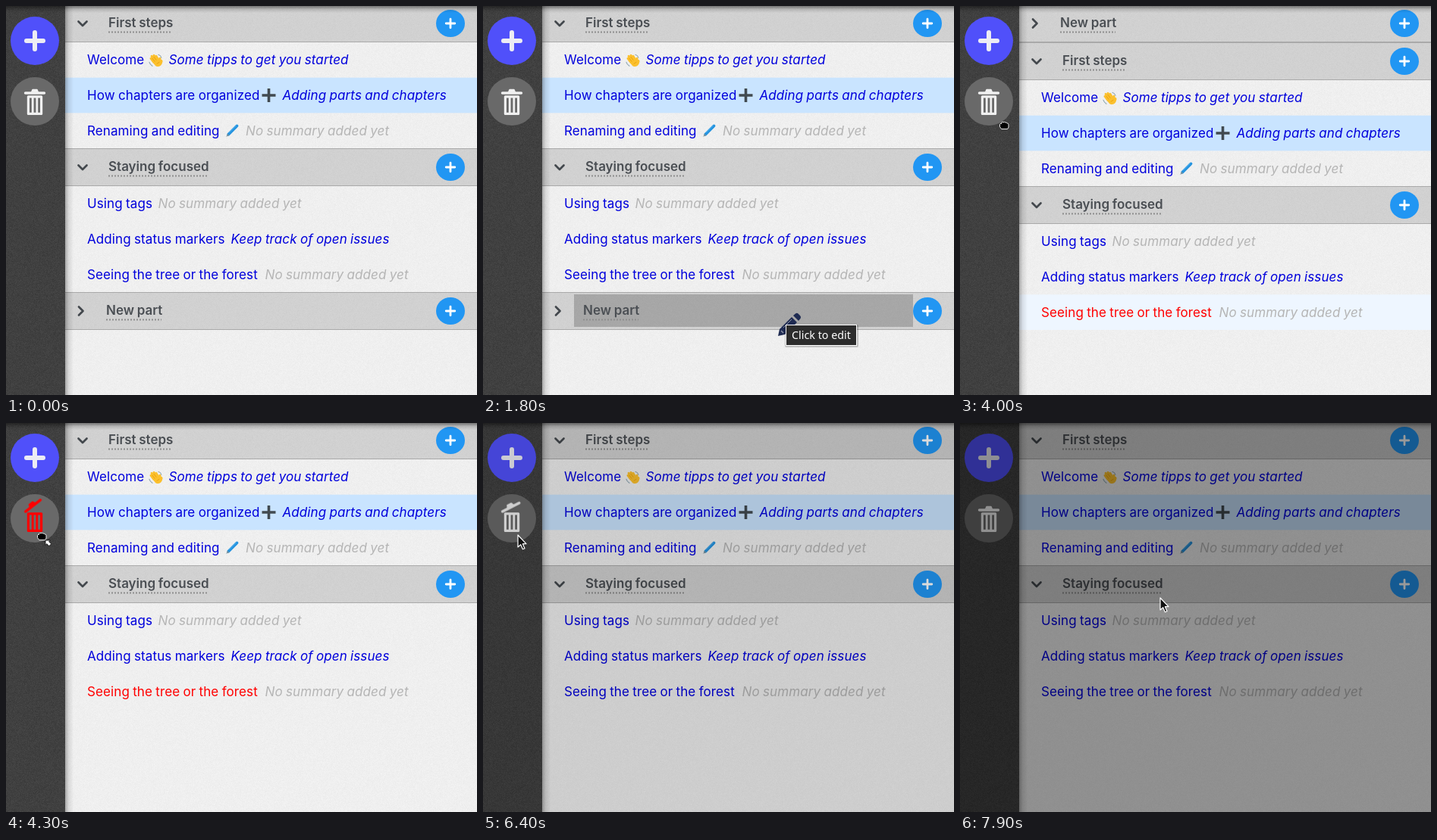
Recreate the animation shown at these times as an HTML page with a canvas. Size 621 px wide and 514 px high, loop 8 s.

```html
<!DOCTYPE html>
<html lang="en">
<head>
<meta charset="utf-8">
<title>Outline editor</title>
<style>
html, body { margin: 0; width: 621px; height: 514px; overflow: hidden; background: #f0f0f0; }
canvas, svg { position: absolute; left: 0; top: 0; display: block; }
text { font: 17px Inter, sans-serif; letter-spacing: .1px; word-spacing: -.6px; white-space: pre; }
.head { font-weight: 600; fill: #4a4e53; letter-spacing: 0; }
.name { fill: #0000dc; }
.sum { fill: #0000dc; font-style: italic; }
.none { fill: #b5b5b5; }
.tip text { font: 14.3px "Noto Sans", sans-serif; letter-spacing: 0; word-spacing: 0; fill: #fff; }
.line { fill: none; stroke-linecap: round; stroke-linejoin: round; }

/* 1.25% is one tenth of a second */
#first, #focus, #part, #hoverRow, #hoverName, #edit, #tip, #bin, #lid, #dim,
#cursor, #arrow, #pencil, #hand, #copy, #move { animation: 8s step-end infinite; }
#edit, #tip, #hoverRow, #arrow, #pencil, #hand, #copy, #move, #dim { opacity: 0; }

#first { animation-name: first; }
@keyframes first {
  0%, 52.5%, 100% { transform: translateY(-2px); }
  43.75% { transform: translateY(48px); }
}
#focus { animation-name: focus; }
@keyframes focus {
  0%, 52.5%, 100% { transform: translateY(188px); }
  36.25% { transform: translateY(238px); }
}
#part { animation-name: part; }
@keyframes part {
  0%, 100% { transform: translateY(378px); opacity: 1; }
  36.25% { transform: translateY(188px); opacity: 1; }
  43.75% { transform: translateY(-2px); opacity: 1; }
  52.5% { transform: translateY(-2px); opacity: 0; }
}
#edit { animation-name: edit; }
@keyframes edit {
  0%, 36.25%, 100% { opacity: 0; }
  12.5% { opacity: .07; }
  13.75% { opacity: .14; }
  15% { opacity: .2; }
}
#tip { animation-name: tip; }
@keyframes tip { 0%, 26.25%, 100% { opacity: 0; } 22.5% { opacity: 1; } }
#hoverRow { animation-name: hoverRow; }
@keyframes hoverRow { 0%, 52.5%, 100% { opacity: 0; } 36.25% { opacity: 1; } }
#hoverName { animation-name: hoverName; }
@keyframes hoverName { 0%, 80%, 100% { fill: #0000dc; } 36.25% { fill: #f00; } }

#bin { animation-name: bin; }
@keyframes bin { 0%, 80%, 100% { color: #f0f0f0; } 51.25% { color: #f00; } }
#lid { transform-origin: 25px 117px; animation-name: lid; }
@keyframes lid {
  0%, 81.25%, 100% { transform: none; }
  51.25% { transform: translate(1px, 1px) rotate(-20deg); }
  52.5% { transform: translate(1.5px, 2px) rotate(-38deg); }
  80% { transform: translate(1px, 2px) rotate(-27deg); }
}
#dim { animation-name: dim; }
@keyframes dim {
  0%, 100% { opacity: 0; }
  80% { opacity: .14; }
  81.25% { opacity: .27; }
  82.5% { opacity: .36; }
  83.75%, 99.99% { opacity: .4; }
}

#cursor { animation-name: cursor; }
@keyframes cursor {
  0% { transform: translate(425px, 540px); }
  7.5% { transform: translate(425px, 500px); animation-timing-function: steps(4); }
  12.5% { transform: translate(408px, 427px); animation-timing-function: steps(3); }
  16.25% { transform: translate(404px, 421px); }
  28.75% { transform: translate(385px, 419px); }
  30% { transform: translate(340px, 416px); }
  36.25% { transform: translate(209px, 303px); animation-timing-function: steps(8); }
  46.25% { transform: translate(88px, 172px); }
  47.5% { transform: translate(74px, 163px); }
  48.75% { transform: translate(65px, 160px); }
  50% { transform: translate(58px, 158px); }
  51.25% { transform: translate(55px, 155px); }
  52.5% { transform: translate(50px, 152px); }
  53.75% { transform: translate(47px, 150px); }
  78.75% { transform: translate(48px, 148px); }
  80% { transform: translate(46px, 148px); }
  98.75%, 100% { transform: translate(264px, 231px); }
}
#arrow { animation-name: arrow; }
@keyframes arrow { 0%, 12.5% { opacity: 0; } 7.5%, 80%, 100% { opacity: 1; } }
#pencil { animation-name: pencil; }
@keyframes pencil { 0%, 30%, 100% { opacity: 0; } 12.5% { opacity: 1; } }
#hand { animation-name: hand; }
@keyframes hand { 0%, 80%, 100% { opacity: 0; } 30% { opacity: 1; } }
#copy { animation-name: copy; }
@keyframes copy { 0%, 47.5%, 100% { opacity: 0; } 30% { opacity: 1; } }
#move { animation-name: move; }
@keyframes move { 0%, 80%, 100% { opacity: 0; } 51.25% { opacity: 1; } }
</style>
</head>
<body>
<canvas id="paper" width="621" height="514"></canvas>
<svg width="621" height="514" viewBox="0 0 621 514">
  <defs>
    <linearGradient id="side">
      <stop stop-opacity=".3"/><stop offset=".4" stop-opacity=".1"/><stop offset="1" stop-opacity="0"/>
    </linearGradient>
    <linearGradient id="top" x2="0" y2="1">
      <stop stop-opacity=".45"/><stop offset=".5" stop-opacity=".13"/><stop offset="1" stop-opacity="0"/>
    </linearGradient>
    <g id="wave" class="line" stroke="#fbc02d">
      <path d="M-3 0L2 6Q6 7 7 2Z" fill="#fbc02d" stroke-width="5"/>
      <path d="M-2 3L-6 -2M0 1L-5 -5M2 0L-2 -6M4 0L1 -5M6 3L6 -2" stroke-width="2.9"/>
      <path d="M-1 2L-4 -2M1 0L-2 -4M5 3L2 5" stroke="#e59600" stroke-width=".7"/>
      <path d="M4 -7Q7 -6 8 -3M-8 3Q-7 6 -4 8" stroke="#8ba4b0" stroke-width="1.1"/>
    </g>
    <path id="plus" d="M-9 0H9M0 -9V9" stroke="#414a50" stroke-width="3.6"/>
    <g id="pen" class="line">
      <path d="M-5 5L6.2 -6.2" stroke="#2493df" stroke-width="3.8"/>
      <path d="M-4 2.5L5 -6.5" stroke="#5cb8f2" stroke-width=".9"/>
      <path d="M-8 8L-6.3 4L-4 6.3Z" fill="#78909c"/>
    </g>
    <g id="add" class="line">
      <ellipse rx="19" ry="18" fill="#2196f3"/>
      <path d="M-5.8 0H5.8M0 -5.8V5.8" stroke="#fff" stroke-width="2.8"/>
    </g>
  </defs>

  <g id="list"></g>
  <rect x="78" width="11" height="514" fill="url(#side)"/>
  <rect width="621" height="9" fill="url(#top)"/>

  <circle cx="38" cy="46" r="32" fill="#5050fa"/>
  <path class="line" d="M27 46H49M38 35V57" stroke="#ececf4" stroke-width="6"/>
  <circle cx="38" cy="126" r="32" fill="#696969"/>
  <g id="bin" class="line" stroke="currentColor">
    <path d="M29.4 119.8H46.6V142.4H29.4Z" stroke-width="3.2"/>
    <path d="M35.2 121V142M40.8 121V142" stroke-width="2.8"/>
    <g id="lid">
      <path d="M25.6 115H50.4" stroke-width="3.6"/>
      <path d="M33.5 114L35 110.5H41L42.5 114Z" fill="currentColor" stroke-width="1.4"/>
    </g>
  </g>

  <rect id="dim" width="621" height="514"/>

  <g id="cursor">
    <path id="arrow" d="M0 0V16L3.7 12.7L6.4 18.8L9 17.7L6.4 11.7H11Z" fill="#111" stroke="#fff" stroke-width="1.2" stroke-linejoin="round"/>
    <g id="pencil" fill="#1f2b52">
      <path d="M-15 15L-13 6L3 -10L10 -3L-6 13Z"/>
      <path d="M5 -12L8 -14.5Q10 -16 12 -14L14 -12Q16 -10 14.5 -8L12 -5Z"/>
      <path d="M-8 4L3 -7" stroke="#8f96a8"/>
      <path d="M-11 8L-8 11" stroke="#8f96a8" stroke-width="1.5"/>
    </g>
    <g id="hand">
      <path d="M-5.5 -1.5Q-5 -3 -3.5 -2.5V-4Q-2.5 -5.2 -1 -4.4Q.5 -5.2 2 -4Q3.5 -4.6 4.2 -3Q6 -3 6 -1.5V2L4.8 4.5H-3.4L-5.5 1.5Z" fill="#000" stroke="#fff" stroke-width=".9"/>
      <g id="copy" fill="#fff" stroke="#000">
        <path d="M2.5 3.5H8.5V10.5H2.5Z"/>
        <path d="M5 5L6 11L7.5 9.5L9.5 12L11 10.5L9 8.5L10.5 7Z"/>
      </g>
      <path id="move" d="M5 5H11.4L9.6 6.8L12.6 9.8L9.8 12.6L6.8 9.6L5 11.4Z" fill="#fff" stroke="#000" stroke-width=".8"/>
    </g>
  </g>

  <g id="tip" class="tip">
    <rect x="398" y="421" width="97" height="30" rx="2" fill-opacity=".2"/>
    <rect x="399.5" y="421.5" width="93" height="27" fill="#2c2c2c" stroke="#fff"/>
    <text x="407" y="440">Click to edit</text>
  </g>
</svg>
<script>
const EMPTY = 'No summary added yet';
const ROW = 140 / 3;

const header = (title, width, closed) => {
  const x = closed ? 132 : 135;
  const chevron = closed ? 'M96 19.5L101.5 25L96 30.5' : 'M95.5 22.5L101 28L106.5 22.5';
  return `<rect x="78" width="543" height="50" fill-opacity=".125"/>
    <path d="M78 .5H621M78 49.5H621" stroke="#a9a9a9"/>
    ${closed ? '<rect id="edit" x="120" y="3" width="447" height="43"/>' : ''}
    <path class="line" d="${chevron}" stroke="#43484d" stroke-width="2.7"/>
    <text class="head" x="${x}" y="30.3">${title}</text>
    <path d="M${x} 36.5H${x + width}" stroke="#8d8d8d" stroke-width="1.8" stroke-dasharray="2 2"/>
    <use href="#add" x="586" y="25"/>`;
};

const chapter = ({ name, sum = EMPTY, x, icon, iconX, fill, hover }, i) => {
  const y = 50 + i * ROW;
  const back = fill ? `<rect ${hover ? 'id="hoverRow"' : ''} x="78" y="${y}" width="543" height="${ROW}" fill="${fill}"/>` : '';
  return `${back}
    <text class="name" ${hover ? 'id="hoverName"' : ''} x="107" y="${y + 29.2}">${name}</text>
    ${icon ? `<use href="#${icon}" x="${iconX}" y="${y + 23.3}"/>` : ''}
    <text class="sum ${sum === EMPTY ? 'none' : ''}" x="${x}" y="${y + 29.2}">${sum}</text>`;
};

const group = (id, head, rows = []) => `<g id="${id}">${head}${rows.map(chapter).join('')}</g>`;

document.getElementById('list').innerHTML =
  group('first', header('First steps', 84), [
    { name: 'Welcome', icon: 'wave', iconX: 197, sum: 'Some tipps to get you started', x: 214.5 },
    { name: 'How chapters are organized', icon: 'plus', iconX: 346.5, sum: 'Adding parts and chapters', x: 364.5, fill: '#c9e4ff' },
    { name: 'Renaming and editing', icon: 'pen', iconX: 298.3, x: 316 }
  ]) +
  group('focus', header('Staying focused', 131), [
    { name: 'Using tags', x: 200.5 },
    { name: 'Adding status markers', sum: 'Keep track of open issues', x: 296.5 },
    { name: 'Seeing the tree or the forest', x: 341.5, fill: '#eef6ff', hover: true }
  ]) +
  group('part', header('New part', 73, true));

// Fine paper grain, stronger on the dark bar
const ctx = document.getElementById('paper').getContext('2d');
const grain = ctx.createImageData(621, 514);
let seed = 7;
const random = () => (seed = (seed * 16807) % 2147483647) / 2147483647;
for (let i = 0; i < grain.data.length; i += 4) {
  const dark = (i / 4) % 621 < 78;
  const level = (dark ? 64 : 239) + (random() + random() - 1) * (dark ? 9 : 5);
  grain.data.fill(level, i, i + 3);
  grain.data[i + 3] = 255;
}
ctx.putImageData(grain, 0, 0);
</script>
</body>
</html>
```
